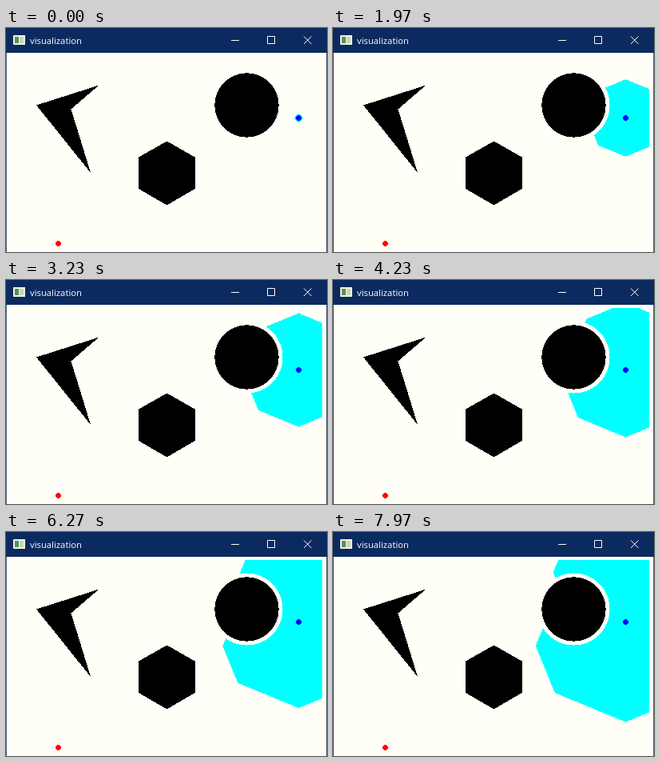
These frames come from a looping animation (402x280 px, 8000 ms). An HTML page with a canvas:

```html
<!DOCTYPE html>
<html lang="en">
<head>
<meta charset="utf-8">
<title>visualization</title>
<style>
  html, body { margin: 0; width: 100%; height: 100%; overflow: hidden; background: #fffff8; }
  canvas, svg { position: absolute; left: 0; top: 0; width: 402px; height: 280px; display: block; }
  text { font: 11.3px "Open Sans", "Noto Sans", sans-serif; fill: #fff; }
</style>
</head>
<body>
<canvas id="field" width="402" height="280"></canvas>
<svg viewBox="0 0 402 280">
  <g shape-rendering="crispEdges">
    <path fill="#0b2a5f" d="M0 0H402V31H0Z"/>
    <path fill="#52657f" d="M0 31H1V280H0ZM401 31H402V280H401Z"/>
    <path fill="#f4f4dc" d="M9 9H24V21H9Z"/>
    <path fill="#4f9160" d="M11 11H16V19H11Z"/>
    <path fill="#c4d8b8" d="M17 11H22V19H17Z"/>
    <path d="M38 96.5L116.5 71.5L81.5 101.5L106 181Z"/>
    <path d="M201.5 141.5L236.5 161.5V201L201.5 221.5L166 201V161.5Z"/>
    <circle cx="301.5" cy="96.5" r="40.2"/>
    <circle cx="65.5" cy="269.5" r="3.2" fill="#f00"/>
    <circle cx="366.5" cy="112.5" r="3.2" fill="#00f"/>
  </g>
  <text x="30" y="20">visualization</text>
  <g fill="none" stroke="#fff">
    <path d="M282 15.5H292M327.5 10.5H336.5V19.5H327.5Z"/>
    <path d="M373 10.5L382.5 20M382.5 10.5L373 20"/>
  </g>
</svg>
<script>
const W = 402, H = 280, LOOP = 8000, STEP = 45.7;
const START = { x: 366, y: 112 }, DISC = { x: 301, y: 96, r: 45 };
const STRAIGHT = 100, DIAGONAL = 141, MAX_COST = 12800;

// [time in ms, search radius in px]
const KEYS = [[0, 5], [1970, 48.3], [3230, 71], [4230, 84], [5330, 96], [6270, 107.5], [7970, 125]];

const isFree = (x, y) => x >= 6 && x <= 395 && y >= 35 && y < H &&
  Math.hypot(x - DISC.x, y - DISC.y) > DISC.r;

// Dijkstra over the pixel grid, with one bucket per integer cost.
function search() {
  const cost = new Int32Array(W * H).fill(1e9);
  const buckets = [], visited = [];
  const push = (i, c) => {
    if (c >= cost[i] || c > MAX_COST) return;
    cost[i] = c;
    (buckets[c] ||= []).push(i);
  };
  push(START.y * W + START.x, 0);
  for (let c = 0; c <= MAX_COST; c++) {
    for (const i of buckets[c] || []) {
      if (cost[i] !== c) continue;
      visited.push(i);
      const x = i % W, y = (i - x) / W;
      for (let dy = -1; dy <= 1; dy++) {
        for (let dx = -1; dx <= 1; dx++) {
          if ((dx || dy) && isFree(x + dx, y + dy)) {
            push(i + dy * W + dx, c + (dx && dy ? DIAGONAL : STRAIGHT));
          }
        }
      }
    }
  }
  return { cost, visited };
}

const { cost, visited } = search();
const stepAt = t => Math.floor((t - 30) / STEP) + 1;
const countWithin = r => visited.filter(i => cost[i] <= r * STRAIGHT).length;
const stops = KEYS.map(([t, r]) => [stepAt(t), countWithin(r)]);

function countAt(step) {
  let k = 1;
  while (k < stops.length - 1 && step > stops[k][0]) k++;
  const [s0, n0] = stops[k - 1], [s1, n1] = stops[k];
  return Math.min(visited.length, Math.round(n0 + (n1 - n0) * (step - s0) / (s1 - s0)));
}

const ctx = document.getElementById("field").getContext("2d");
const image = ctx.createImageData(W, H);
const pixels = new Uint32Array(image.data.buffer);
const CYAN = 0xffffff00; // ABGR
let shown = -1;

function draw(now) {
  const count = countAt(stepAt(now % LOOP));
  if (count !== shown) {
    pixels.fill(0);
    for (let n = 0; n < count; n++) pixels[visited[n]] = CYAN;
    ctx.putImageData(image, 0, 0);
    shown = count;
  }
}

const origin = performance.now();
function tick() {
  draw(Math.max(0, performance.now() - origin));
  requestAnimationFrame(tick);
}
tick();
</script>
</body>
</html>
```
